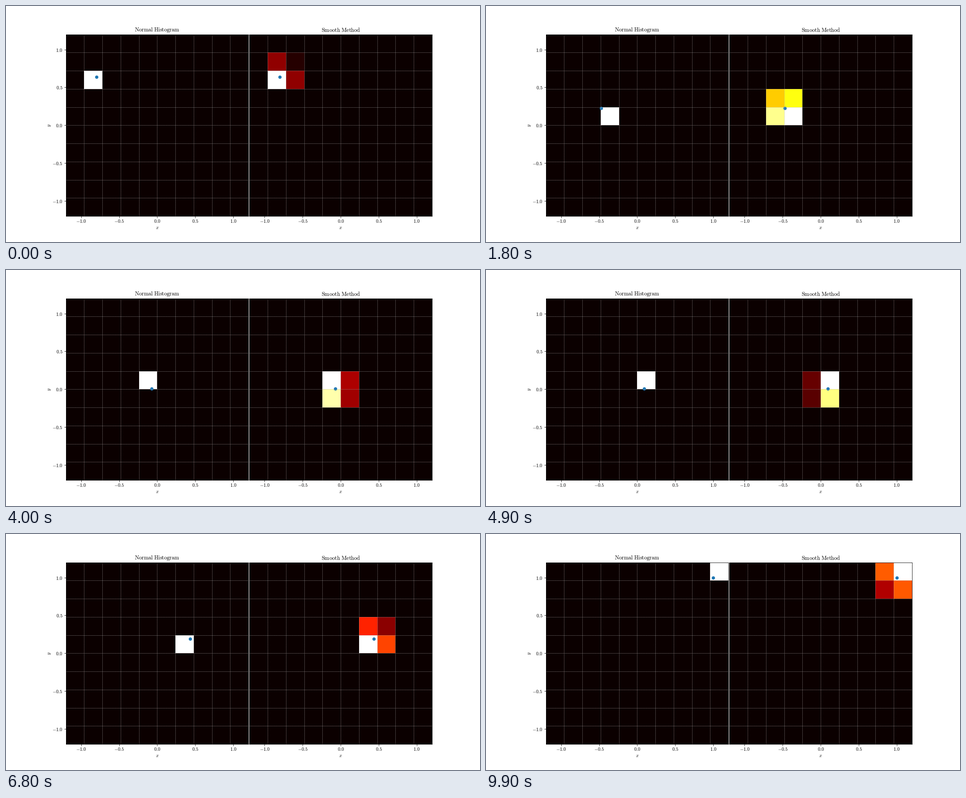
These frames come from a looping animation (1058 px wide and 529 px high, 10 s). A matplotlib script:

```python
import numpy as np
import matplotlib.pyplot as plt
from matplotlib.animation import FuncAnimation

W, H = 1058, 529
DPI = 75.5714286
SIDE = 407.33  # panel size in pixels
FRAMES, INTERVAL = 100, 100
LIM, BINS = 1.2, 10
STEP = 2 * LIM / BINS
EDGES = np.linspace(-LIM, LIM, BINS + 1)
TICKS = np.linspace(-1, 1, 5)

plt.rcParams.update({"font.family": "Liberation Serif", "mathtext.fontset": "cm"})


def bin_of(v):
    """Index of the bin that holds v and v's offset from its centre, in bins."""
    pos = (v + LIM) / STEP
    i = int(np.floor(pos))
    return i, pos - i - 0.5


def histograms(x, y):
    """Hard and bilinear counts of one point, each scaled to a peak of 1."""
    hard = np.zeros((BINS, BINS))
    soft = np.zeros((BINS, BINS))
    # The nudge settles a point that lies exactly on a bin edge
    i, dx = bin_of(x - 1e-9)
    j, dy = bin_of(y + 1e-9)
    hard[j, i] = 1
    for a, wx in ((i, 1 - abs(dx)), (i + (1 if dx > 0 else -1), abs(dx))):
        for b, wy in ((j, 1 - abs(dy)), (j + (1 if dy > 0 else -1), abs(dy))):
            if 0 <= a < BINS and 0 <= b < BINS:
                soft[b, a] = wx * wy
    return hard, soft / soft.max()


def panel(x, title, pad):
    """Axes whose left edge is at pixel x, with the cell mesh and the dot."""
    ax = fig.add_axes((x / W, 58 / H, SIDE / W, SIDE / H))
    mesh = ax.pcolormesh(EDGES, EDGES, np.zeros((BINS, BINS)),
                         cmap="hot", vmin=0, vmax=1, zorder=0)
    for e in EDGES[1:-1]:
        for line in (ax.axvline, ax.axhline):
            line(e, color="#b0b0b0", lw=0.5, ls="--", zorder=1.5)
    dot = ax.scatter([0], [0], s=36, color="C0", zorder=1)
    ax.set_xlim(-LIM, LIM)
    ax.set_ylim(-LIM, LIM)
    labels = [f"${t:.1f}$" for t in TICKS]
    ax.set_xticks(TICKS, labels, fontsize=10)
    ax.set_yticks(TICKS, labels, fontsize=10)
    ax.tick_params(axis="x", pad=1.6)
    ax.set_xlabel("$x$", fontsize=10)
    ax.set_title(r"$\mathrm{%s}$" % title.replace(" ", r"\ "), fontsize=11.7, pad=pad)
    return ax, mesh, dot


fig = plt.figure(figsize=(14, 7), dpi=DPI)
panels = [panel(133.7, "Normal Histogram", 6), panel(543.49, "Smooth Method", 5)]
panels[0][0].set_ylabel("$y$", fontsize=10, labelpad=0)
panels[1][0].tick_params(left=False, labelleft=False)

xs = np.linspace(-0.8, 1, FRAMES)


def update(k):
    x = xs[k]
    y = x * x
    for (_, mesh, dot), counts in zip(panels, histograms(x, y)):
        mesh.set_array(counts)
        dot.set_offsets([(x, y)])
    return [artist for _, *artists in panels for artist in artists]


anim = FuncAnimation(fig, update, frames=FRAMES, interval=INTERVAL,
                     repeat=True, repeat_delay=0, blit=False)
plt.show()
```
